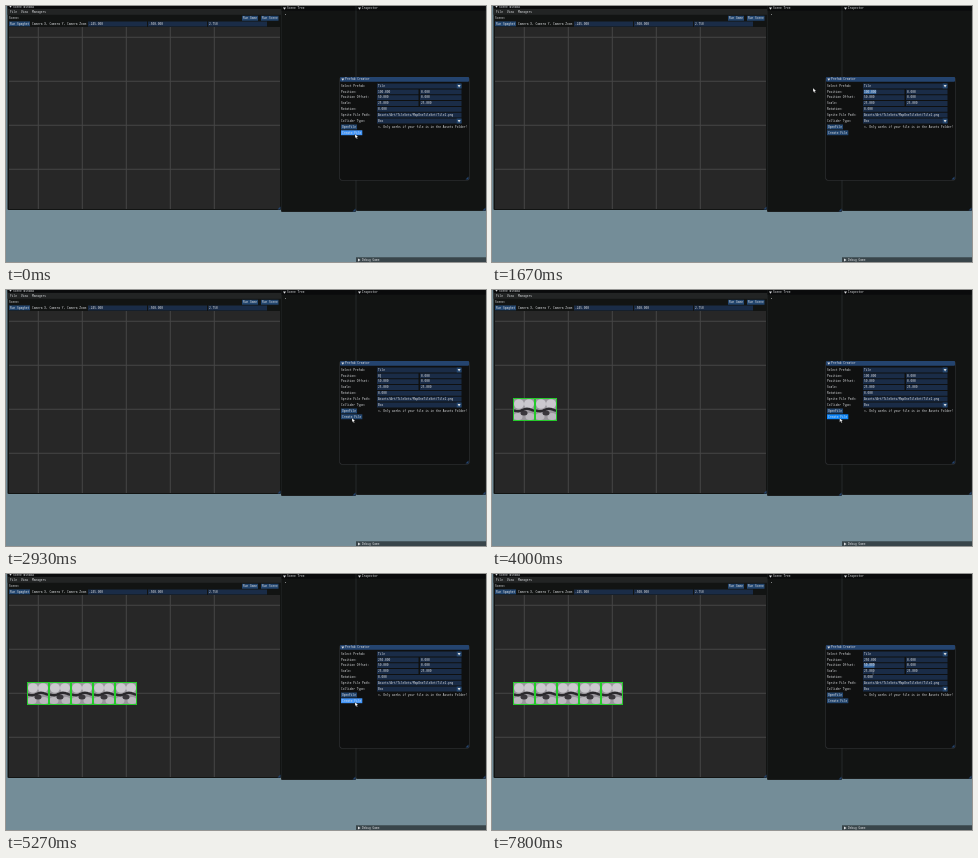
Write an HTML page with a canvas that moves like this. It is 480 px wide and 256 px high and loops after 8000 ms.

```html
<!DOCTYPE html>
<html>
<head>
<meta charset="utf-8">
<style>
html, body { margin: 0; width: 100%; height: 100%; overflow: hidden; background: #748d98; }
canvas { display: block; width: 480px; height: 256px; }
</style>
</head>
<body>
<canvas id="stage" width="480" height="256"></canvas>
<script>
const ctx = document.getElementById('stage').getContext('2d');
const LOOP = 8000, CELL = 44, TILE = 22;
const PANEL = '#121413', BAR = '#0a0b0c', BUTTON = '#23466f', FIELD = '#1a2c47';
const HOVER = '#4296fa', PRESSED = '#0f87fa', TEXT = '#d8dadd';
const clicks = [3130, 3530, 4070, 4470, 4870];

// Cursor moves: start, end, destination
const home = [349, 128];
const moves = [
  [470, 1300, 384, 87], [1450, 1530, 321, 82], [1670, 1930, 331, 86],
  [2070, 2870, 346, 128], [2950, 4900, ...home], [5270, 5930, 380, 101],
  [6700, 6730, 351, 89], [7530, 7800, 380, 97]
];

function box(x, y, w, h, color, r = 0) {
  ctx.fillStyle = color;
  ctx.beginPath();
  ctx.roundRect(x, y, w, h, r);
  ctx.fill();
}

function label(s, x, y) {
  ctx.save();
  ctx.translate(x, y);
  ctx.scale(0.25, 0.25);
  ctx.font = '11.63px "DejaVu Sans Mono", monospace';
  ctx.textBaseline = 'middle';
  ctx.fillStyle = TEXT;
  ctx.fillText(s, 0, 0);
  ctx.restore();
}

function poly(points, color) {
  ctx.fillStyle = color;
  ctx.beginPath();
  points.forEach(([x, y]) => ctx.lineTo(x, y));
  ctx.closePath();
  ctx.fill();
}

function arrow(x, y, down = true) {
  poly(down ? [[x, y - 1], [x + 3, y - 1], [x + 1.5, y + 1.4]]
            : [[x, y - 1.5], [x + 2.6, y], [x, y + 1.5]], TEXT);
}

function grip(x, y) {
  poly([[x - 0.5, y - 3.5], [x - 0.5, y - 0.5], [x - 3.5, y - 0.5]], '#24446e');
}

function button(s, x, y, w, color = BUTTON) {
  box(x, y, w, 4.9, color);
  label(s, x + 1, y + 2.5);
}

function field(s, x, y, w) {
  box(x, y - 2.4, w, 4.8, FIELD);
  label(s, x + 1, y);
}

function panel(x, w, h, title) {
  box(x, -2, w, h + 2, '#24282a', 1);
  box(x + 0.5, -2, w - 1, h + 1.5, PANEL, 1);
  box(x + 0.5, 0, w - 1, 4.8, BAR);
  arrow(x + 2, 2.4);
  label(title, x + 6, 2.5);
  grip(x + w, h);
}

function lobe(x, y, rx, ry, color) {
  ctx.fillStyle = color;
  ctx.beginPath();
  ctx.ellipse(x, y, rx, ry, 0, 0, Math.PI * 2);
  ctx.fill();
}

// Pale stones split by a dark wavy crack
function tile(x, y) {
  ctx.save();
  ctx.translate(x, y);
  box(0, 0, TILE, 23, '#99969c');
  for (let i = 0; i < 2; i++) {
    lobe(6 + 10 * i, 6, 5, 4.8, '#cbc8ce');
    lobe(5 + 12 * i, 18.5, 4.5, 3.5, '#bbb8be');
  }
  lobe(11, 15, 3.5, 2.5, '#3a373c');
  ctx.beginPath();
  for (let px = 1; px < TILE; px++) ctx.lineTo(px, 12 + 1.2 * Math.sin(px / 3));
  ctx.strokeStyle = '#2b292d';
  ctx.lineWidth = 2.4;
  ctx.stroke();
  ctx.strokeStyle = '#25cb2b';
  ctx.lineWidth = 1;
  ctx.strokeRect(0.5, 0.5, TILE - 1, 22);
  ctx.restore();
}

function drawScene(count) {
  box(1.5, -4, 273.5, 208, PANEL, 1);
  box(1.5, -3, 273.5, 5.7, BAR);
  arrow(3, 0.4);
  label('Scene Window', 7, 0.8);
  box(1.5, 3, 273.5, 5.8, '#222424');
  label('File', 4, 5.9);
  label('View', 15, 5.9);
  label('Managers', 26, 5.9);
  label('Scene:', 3, 12.2);
  button('Run Game', 236, 9.8, 16);
  button('Run Scene', 255, 9.8, 17.5);
  button('Run Spaghet', 3, 15.4, 21);
  label('Camera X, Camera Y, Camera Zoom', 26, 18);
  ['-245.000', '-500.000', '2.750'].forEach((s, i) => field(s, 82 + 60 * i, 18, 59));

  box(3, 21, 271, 182, '#272727');
  for (let i = 0; i < 5; i++) box(31.8 + i * CELL, 21, 1, 182, '#464646');
  for (let i = 0; i < 4; i++) box(3, 30.8 + i * CELL, 271, 1, '#464646');
  for (let i = 0; i < count; i++) tile(21 + i * TILE, 108);
  grip(275, 204);
}

function drawCreator(t, count) {
  const rowY = i => 80 + i * 5.83;
  const pair = (i, a, b) => {
    field(a, 371, rowY(i), 41.5);
    field(b, 414, rowY(i), 41.5);
  };
  const wide = (i, s) => field(s, 371, rowY(i), 84.5);
  const combo = (i, s) => {
    wide(i, s);
    box(450.7, rowY(i) - 2.4, 4.8, 4.8, BUTTON);
    arrow(451.6, rowY(i));
  };
  const select = (i, s) => {
    box(372, rowY(i) - 2, s.length * 1.75, 4, '#3c6ea8');
    label(s, 372, rowY(i));
  };

  box(333.5, 71, 130, 103.5, '#34373a', 2);
  box(334, 71.5, 129, 102.5, '#0f1010', 2);
  box(334, 70.9, 129, 4.9, '#24446f', 1);
  arrow(335.3, 73.4);
  label('Prefab Creator', 339, 73.5);
  ['Select Prefab:', 'Position:', 'Position Offset:', 'Scale:', 'Rotation:',
   'Sprite File Path:', 'Collider Type:'].forEach((s, i) => label(s, 335, rowY(i)));

  const typing = t >= 2130 && t < clicks[0];
  const pos = t < 2130 ? '100.000' : typing ? '0' : (count * 50).toFixed(3);
  combo(0, 'Tile');
  pair(1, pos, '0.000');
  pair(2, '50.000', '0.000');
  pair(3, '25.000', '25.000');
  wide(4, '0.000');
  wide(5, 'Assets/Art/TileSets/MapOneTileSet/Tile1.png');
  combo(6, 'Box');
  if (t >= 1500 && t < 2130) select(1, pos);
  if (t >= 6730) select(2, '50.000');
  if (typing) box(374, rowY(1) - 1.8, 0.4, 3.6, TEXT);

  const hover = t < 560 || (t >= 2990 && t < 5400);
  const pressed = clicks.some(c => t >= c - 140 && t < c);
  button('OpenFile', 335, 118.5, 16);
  label('<- Only works if your file is in the Assets Folder!', 372, 121);
  button('Create File', 335, 124.3, 21.3, pressed ? PRESSED : hover ? HOVER : BUTTON);
  grip(463, 174);
}

function cursorAt(t) {
  let [x, y] = home;
  for (const [from, to, toX, toY] of moves) {
    const u = Math.max(0, Math.min(1, (t - from) / (to - from)));
    const k = u * u * (3 - 2 * u);
    x += (toX - x) * k;
    y += (toY - y) * k;
  }
  return [x, y];
}

function drawCursor(t) {
  const [x, y] = cursorAt(t);
  const overText = y < 118 && (x > 371 || t >= 6700);
  if (overText) {
    box(x + 0.8, y, 0.5, 4, '#7d8791');
    return;
  }
  ctx.save();
  ctx.translate(x, y);
  poly([[0, 0], [0, 4.2], [1, 3.3], [1.8, 5], [2.6, 4.6], [1.9, 3.1], [3.2, 3]], '#fff');
  ctx.strokeStyle = '#111';
  ctx.lineWidth = 0.3;
  ctx.stroke();
  ctx.restore();
}

function draw(t) {
  const count = clicks.filter(c => t >= c).length;
  box(0, 0, 480, 256, '#748d98');
  drawScene(count);
  panel(275, 75, 206, 'Scene Tree');
  box(279, 8, 0.8, 0.8, '#c8cacc');
  panel(350, 130, 205, 'Inspector');
  box(350, 251.3, 130, 5, 'rgba(0, 0, 0, 0.51)');
  arrow(352, 254, false);
  label('Debug Game', 356, 254);
  drawCreator(t, count);
  drawCursor(t);
}

const start = performance.now();
function tick() {
  draw((performance.now() - start) % LOOP);
  requestAnimationFrame(tick);
}
tick();
</script>
</body>
</html>
```
